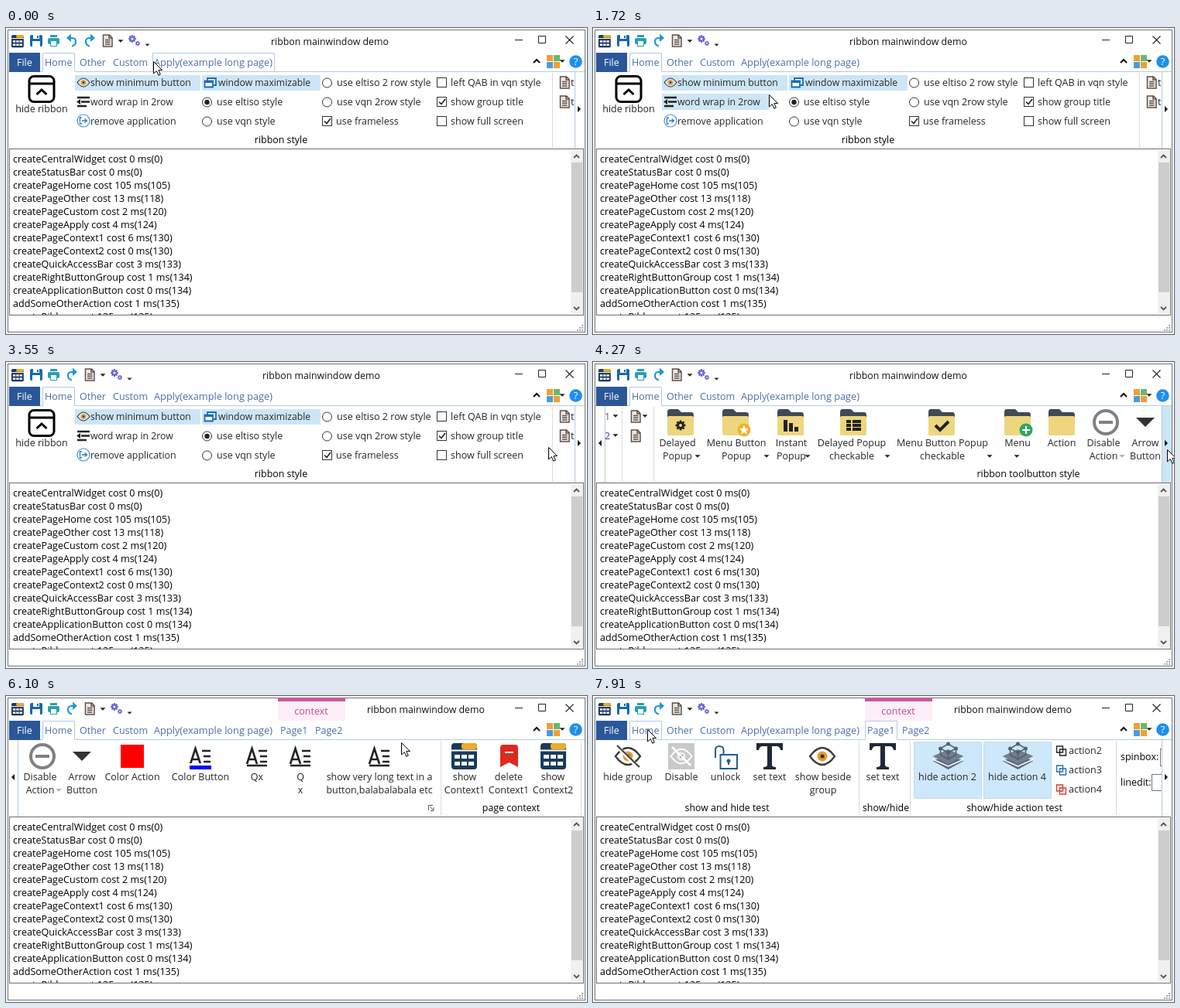
An HTML page with a canvas for the animation above (8000 ms loop, 750x396 px).

```html
<!DOCTYPE html>
<html lang="en">
<head>
<meta charset="utf-8">
<title>ribbon mainwindow demo</title>
<style>
html, body { margin: 0; width: 100%; height: 100%; overflow: hidden; background: #fff; }
canvas { display: block; width: 750px; height: 396px; }
</style>
</head>
<body>
<canvas id="stage" width="750" height="396"></canvas>
<script>
const g = document.getElementById('stage').getContext('2d');
const LOOP = 8000;
const FONT = '"Open Sans", "Noto Sans", "Noto Sans CJK SC", sans-serif';
const INK = '#262626', LIT = '#cde6f7', EDGE = '#b4cbe4', SEP = '#dcdcdc', NAVY = '#1c3a5e', BLUE = '#1f77c0';
const PINK = '#fdeff7', TEAL = '#2a9fb0', LOCK = '#245a94';

// Moments when the window state changes
const MENU_OPEN = 670, MENU_DONE = 1720, SCROLL_1 = 4030, SCROLL_2 = 4830,
      CONTEXT = 5710, PAGE_2 = 6610, PAGE_1 = 7090;

// Pointer stops: time, x, y
const POINTER = [
  [0, 190, 43], [120, 187, 39], [270, 185, 28], [390, 182, 18], [790, 184, 20], [910, 190, 24],
  [1060, 209, 54], [1180, 219, 71], [1300, 226, 85], [1450, 227, 86], [2000, 226, 82],
  [2150, 226, 67], [2300, 240, 62], [2420, 256, 58], [2570, 284, 54], [2690, 304, 51],
  [2840, 307, 55], [3120, 443, 63], [3270, 552, 84], [3400, 638, 103], [3550, 700, 110],
  [3670, 736, 113], [3790, 741, 113], [5140, 655, 113], [5290, 628, 110], [5410, 613, 107],
  [5560, 597, 102], [5830, 591, 90], [5980, 556, 74], [6100, 510, 60], [6220, 458, 48],
  [6340, 424, 44], [6460, 416, 43], [6850, 396, 43], [6970, 377, 43], [7090, 375, 43],
  [7520, 262, 42], [7640, 172, 41], [7790, 112, 42], [7910, 70, 43]
];
const TABS = [['Home', 47, 89], ['Other', 92, 133], ['Custom', 135, 186], ['Apply(example long page)', 187, 347],
              ['Page1', 351, 393], ['Page2', 396, 437]];
const LOG = ['createCentralWidget cost 0 ms(0)', 'createStatusBar cost 0 ms(0)', 'createPageHome cost 105 ms(105)',
  'createPageOther cost 13 ms(118)', 'createPageCustom cost 2 ms(120)', 'createPageApply cost 4 ms(124)',
  'createPageContext1 cost 6 ms(130)', 'createPageContext2 cost 0 ms(130)', 'createQuickAccessBar cost 3 ms(133)',
  'createRightButtonGroup cost 1 ms(134)', 'createApplicationButton cost 0 ms(134)',
  'addSomeOtherAction cost 1 ms(135)', 'createRibbon cost 135 ms(135)'];

let mx = 0, my = 0;
const over = (x0, y0, x1, y1) => mx >= x0 && mx < x1 && my >= y0 && my < y1;

function rect(c, x, y, w, h) { g.fillStyle = c; g.fillRect(x, y, w, h); }
function box(c, x, y, w, h) { g.strokeStyle = c; g.lineWidth = 1; g.strokeRect(x + .5, y + .5, w - 1, h - 1); }
function fill(c, d) { g.fillStyle = c; g.fill(new Path2D(d)); }
function line(c, w, d) { g.strokeStyle = c; g.lineWidth = w; g.stroke(new Path2D(d)); }
function disc(c, x, y, r, w) {
  g.beginPath(); g.arc(x, y, r, 0, 7);
  if (w) { g.strokeStyle = c; g.lineWidth = w; g.stroke(); } else { g.fillStyle = c; g.fill(); }
}
function round(c, x, y, w, h, r) { g.beginPath(); g.roundRect(x, y, w, h, r); g.fillStyle = c; g.fill(); }
function at(x, y, s, draw) { g.save(); g.translate(x, y); g.scale(s, s); draw(); g.restore(); }
function clip(x, y, w, h, draw) { g.save(); g.beginPath(); g.rect(x, y, w, h); g.clip(); draw(); g.restore(); }
function text(s, x, y, c = INK, size = 12.5, align = 'left') {
  g.font = `${size}px ${FONT}`; g.fillStyle = c; g.textAlign = align;
  g.fillText(s, x, Math.floor(y + 4.5)); // whole-pixel baseline
}
const mid = (s, x, y, c, size) => text(s, x, y, c, size, 'center');
const label = (x, ...rows) => rows.forEach((s, i) => mid(s, x, 104.5 + 17 * i));
const caption = (s, x) => mid(s, x, 145, '#000', 12.4);
const sep = x => rect(SEP, x, 58, 1, 97);
const down = (x, y, c = '#222', r = 3.5) => fill(c, `M${x - r} ${y - r / 2}h${2 * r}l${-r} ${r}z`);

// ---- icons ----
const doc = (x, y, s = .5) => at(x, y, s, () => {
  fill('#f0e8e2', 'M2 2H18L25 9V32H2Z');
  line('#5c504c', 3, 'M2 2H18L25 9V32H2ZM17 2V10H25M7 15H20M7 20.500H20M7 26H20');
});
const grid = (x, y, s = 1) => at(x, y, s, () => {
  round(NAVY, 0, 0, 33, 34, 4);
  round('#f0ab24', 13, 0, 20, 8, 3);
  rect('#fff', 0, 8.5, 33, 2);
  for (let i = 0; i < 6; i++) rect('#fff', 4 + i % 3 * 9, i < 3 ? 15 : 24, 7, 5);
});
const eye = (x, y, s = 1, c = '#3c3c3c', iris = '#e79a2c') => at(x, y, s, () => {
  line(c, 2.3, 'M-16 0Q-8 -11 0 -11Q8 -11 16 0Q8 11 0 11Q-8 11 -16 0Z');
  disc(iris, 0, 0, 6.5); disc('#333', 0, 0, 2.5);
});
const gear = (x, y, r, c) => {
  for (let i = 0; i < 8; i++) {
    const a = i * Math.PI / 4, u = Math.cos(a) * r, v = Math.sin(a) * r;
    line(c, r * .5, `M${x + u * .5} ${y + v * .5}L${x + u * 1.3} ${y + v * 1.3}`);
  }
  disc(c, x, y, r * .7, r * .6);
};
const folder = (x, deco) => at(x - 17, 61, 1, () => {
  fill('#414a55', 'M0 4Q0 0 3 0H14L18 4H31Q34 4 34 8V14H0Z');
  round('#edd67e', 0, 9, 34, 25, 2);
  if (deco) deco();
});
const letterA = x => at(x, 78, 1, () => {
  line('#222', 2.6, 'M-13 10L-6.500 -10L0 10M-10.500 4H-2.500');
  line('#222', 2.4, 'M2 -7H13M4 0H13M4 7H13M-13 12H13');
});
const bigT = x => fill('#1f2937', `M${x - 17} 61h34v9h-3q-1 -5 -5 -5h-6v24q0 3 5 3v3h-16v-3q5 0 5 -3v-24h-6q-4 0 -5 5h-3z`);
const layers = x => at(x, 78, 1, () => {
  fill('#5b6b7e', 'M-20 6L0 -2L20 6L0 17Z');
  line('#fff', 1.5, 'M-20 4L0 13L20 4');
  fill('#72808f', 'M-20 0L0 -9L20 0L0 10Z');
  line('#56606c', 1.6, 'M-10 -2V-10L0 -16L10 -10V-2L0 4ZM-10 -10L0 -5L10 -10M0 -5V4');
  for (const [x, y] of [[-10, -10], [0, -16], [10, -10], [0, -5]]) disc('#56606c', x, y, 2.5);
});
const copies = (y, c) => { line(c, 1.4, `M598.500 ${y - 6}h8v8h-8zM602.500 ${y - 2}h8v8h-8z`); };
const curl = (x, flip) => {
  g.save(); g.translate(x, 16); g.scale(flip, 1);
  line('#2196d8', 2.2, 'M-4 -3H1Q5 -3 5 2Q5 6 0 7.500'); fill('#2196d8', 'M-7 -3L-1 -8.500V2Z');
  g.restore();
};

function quickBar(t) {
  const shift = t < MENU_DONE ? 0 : -23;
  grid(7, 9, .48);
  round('#1668ad', 31, 9, 16, 15, 2); rect('#fff', 35, 9, 8, 5); rect('#fff', 34, 17, 10, 7); rect('#1668ad', 40, 10, 2, 3);
  round(TEAL, 54, 13, 15, 8, 2); rect(TEAL, 57, 9, 9, 3); rect('#fff', 57, 17, 9, 7); box(TEAL, 57, 16, 9, 8);
  if (!shift) curl(85, 1);
  curl(108 + shift, -1);
  doc(124.5 + shift, 8); down(148 + shift, 17);
  gear(163 + shift, 14, 3.8, '#6968d0'); gear(170 + shift, 20, 2.4, '#6968d0');
  const open = t >= MENU_OPEN && t < MENU_DONE;
  if (open || t < MENU_DONE && over(178, 6, 189, 28)) { rect(LIT, 178, 6, 11, 22); box('#8dbfe6', 178, 6, 11, 22); }
  down(182.5 + shift, 22, '#222', 3);
}

function frameParts(t) {
  rect('#fff', 0, 0, 750, 396);
  box('#707070', 2, 2, 746, 392);
  if (t >= CONTEXT) {
    rect(PINK, 351, 2, 87, 30);
    rect('#c9579f', 351, 2, 87, 5);
    mid('context', 394, 20, '#bd4a94');
  }
  text('ribbon mainwindow demo', t < MENU_DONE ? 342 : t < CONTEXT ? 331 : 466, 17.5, '#111', 12.35);
  line('#222', 1, 'M657 15.500h10M687.500 10.500h9v9h-9z');
  line('#222', 1.1, 'M722.500 10.500l10 10M732.500 10.500l-10 10');
  line('#111', 2, 'M681 45l4 -4l4 4');
  ['#ef9f35', '#68b96b', '#4a9cd8', '#ef9f35'].forEach((c, i) => rect(c, 698 + i % 2 * 9, 35 + (i >> 1) * 9, 8, 8));
  down(718, 43);
  disc('#1d8ff0', 735.5, 43.5, 8.3);
  mid('?', 735.5, 43.5, '#fff', 13);
}

function tabs(t) {
  const active = t < PAGE_2 ? 'Home' : t < PAGE_1 ? 'Page2' : 'Page1';
  rect(EDGE, 3, 56, 744, 1);
  rect('#2b579a', 4, 32, 40, 25);
  text('File', 14, 45, '#fff');
  const menu = t >= MENU_OPEN && t < MENU_DONE;
  TABS.forEach(([name, x0, x1], i) => {
    if (i > 3 && t < CONTEXT) return;
    const on = name === active, hot = !menu && over(x0, 32, x1 + 1, 57), left = i === 3 ? 189 : x0;
    if (on) rect('#fff', left, 33, x1 - left, 24);
    else if (hot && i > 3) rect(PINK, left, 33, x1 - left, 23);
    if (on || hot) line(EDGE, 1, `M${left + .5} 56.500V32.500H${x1 - .5}V56.500`);
    text(name, left + (i === 3 ? 2 : 3), 45, '#4c6fa8', i === 3 ? 12.75 : 12.5);
  });
}

function check(x, y, on) {
  box('#333', x, y, 13, 13);
  if (on) line('#222', 1.6, `M${x + 3} ${y + 6.500}l3 3l5 -6.500`);
}
function radio(x, y, on, hot) {
  disc(hot ? '#0078d7' : '#333', x, y, 6, 1);
  if (on) disc('#222', x, y, 3.2);
}

function homeStart() {
  g.beginPath(); g.roundRect(30, 62.5, 32, 33, 6); g.strokeStyle = '#000'; g.lineWidth = 3; g.stroke();
  line('#000', 3, 'M30 72H62M39.500 86l6.500 -6l6.500 6');
  label(46, 'hide ribbon');
  rect(LIT, 89, 61, 162, 20); rect(LIT, 253, 61, 153, 20);
  if (over(89, 85, 240, 107)) rect(LIT, 89, 85, 138, 21);
  eye(100, 70.5, .5);
  line('#222', 2.4, 'M92 90H108M97 95.500H108M92 101H104'); fill('#222', 'M91 95.500l5 -3.500v7z');
  disc('#4a90c8', 100, 120, 8, 1.2); line('#2f7fbd', 1.3, 'M98 116H95.500V124H98M98 120H104M101.500 117.500l3 2.500l-3 2.500');
  text('show minimum button', 109, 70.5, INK, 12.2);
  text('word wrap in 2row', 109, 95.5, INK, 12.3);
  text('remove application', 109, 120.5, INK, 12.4);
  rect('#fff', 257, 66, 10, 9); line('#1b6db5', 1.8, 'M260 68V65H271V74H268M256.500 68.500H267V76.500H256.500ZM257 70H267');
  text('window maximizable', 274, 70.5, INK, 12.2);
  radio(259.5, 96, true); text('use eltiso style', 272, 96);
  radio(259.5, 121); text('use vqn style', 272, 121);
  radio(414.5, 71, false, over(408, 60, 555, 82)); text('use eltiso 2 row style', 427, 71, INK, 12.6);
  radio(414.5, 96); text('use vqn 2row style', 427, 96, INK, 12.6);
  check(408, 114, true); text('use frameless', 426, 121);
  check(556, 64); text('left QAB in vqn style', 574, 71);
  check(556, 89, true); text('show group title', 574, 96);
  check(556, 114); text('show full screen', 574, 121);
  caption('ribbon style', 355);
  sep(705);
  for (const y of [62, 87]) { doc(714.5, y); text('test', 729, y + 8.5); }
}

function homeRest() {
  text('1', 15, 70.5, '#8a4f1e'); down(29, 70);
  text('2', 15, 95.5, '#4a3fa0'); down(29, 95);
  sep(37);
  doc(48.5, 62); down(67, 70); doc(48.5, 87);
  sep(78);
  folder(113, () => gear(17, 21, 5, '#222'));
  folder(184, () => {
    disc('#f0b429', 28, 27, 8.5);
    fill('#fff', 'M28 21l1.800 4l4.200 .4l-3.200 2.800l1 4.200l-3.800 -2.200l-3.800 2.200l1 -4.200l-3.200 -2.800l4.200 -.4z');
  });
  folder(255, () => { rect('#222', 8, 14, 5, 15); rect('#222', 15, 18, 5, 11); rect('#222', 22, 23, 5, 6); });
  folder(336, () => { for (let i = 0; i < 6; i++) rect('#222', i % 2 ? 16 : 8, 14 + (i >> 1) * 5, i % 2 ? 11 : 6, 4); });
  folder(450, () => line('#222', 4, 'M9 21l6 6l11 -11'));
  folder(548, () => { disc('#30a566', 28, 27, 8.5); line('#fff', 2.2, 'M23 27h10M28 22v10'); });
  folder(605);
  label(109, 'Delayed', 'Popup'); down(135, 122);
  label(185, 'Menu Button', 'Popup'); down(224, 122);
  label(256, 'Instant', 'Popup'); down(277, 122);
  label(334, 'Delayed Popup', 'checkable'); down(380, 122);
  label(451, 'Menu Button Popup', 'checkable'); down(512, 122);
  label(548, 'Menu'); down(547, 122);
  label(605, 'Action');
  disc('#808080', 662, 78, 15, 4); rect('#808080', 653, 76, 18, 4);
  label(659, 'Disable', 'Action'); down(683, 122, '#aaa');
  fill('#333', 'M701 72H725L713 84Z');
  label(713, 'Arrow', 'Button');
  caption('ribbon toolbutton style', 562);
}

function homeEnd() {
  rect('#f00', 148, 63, 30, 30); label(163, 'Color Action');
  letterA(251); rect('#fff', 236, 87, 30, 9); rect('#00f', 237, 90, 28, 5); label(251, 'Color Button');
  letterA(324); label(324, 'Qx');
  letterA(380); label(380, 'Q', 'x');
  letterA(482); label(482, 'show very long text in a', 'button,balabalabala etc');
  line('#555', 1, 'M545.500 148V141.500H551M547.500 143.500l4 4M552 144V148.500H548');
  sep(561);
  if (over(565, 59, 620, 133)) rect(LIT, 565, 59, 55, 74);
  if (over(622, 59, 677, 133)) rect(LIT, 622, 59, 55, 74);
  grid(575, 61); label(592, 'show', 'Context1');
  fill('#dc2a20', 'M638 67q0 -4 4 -4h15q4 0 4 4v25l-11.500 -6l-11.500 6z'); rect('#fff', 644, 72, 11, 2);
  label(649, 'delete', 'Context1');
  grid(690, 61); label(706, 'show', 'Context2');
  caption('page context', 652);
  sep(742);
}

function pageTwo() {
  disc('#f8403c', 38, 78, 17); line('#fff', 4, 'M31.500 71.500l13 13M44.500 71.500l-13 13');
  label(38, 'delete this', 'page');
  caption('删除PagePage测试', 59);
  sep(113);
  const item = (x, y, s) => { doc(x, y - 8.5); text(s, x + 16.5, y); };
  for (const x of [145, 416, 639]) { doc(x - 13.5, 61, 1); label(x, 'Large'); }
  for (const [x, y] of [[179, 70], [179, 95], [253, 70], [253, 95], [253, 120], [319, 70], [533, 70]]) item(x, y + .5, 'Small');
  sep(243); sep(386);
  for (const [x, y] of [[450, 79], [450, 112], [533, 112], [673, 79], [673, 112]]) item(x, y, 'Medium');
  caption('特殊布局', 581);
}

function pageOne() {
  eye(45, 78); line('#fff', 5, 'M33 67L58 92'); line('#444', 2.3, 'M31 64L60 92');
  label(45, 'hide group');
  rect('#c9c9c9', 97, 61, 34, 34); eye(114, 78, .85, '#fff', '#eee'); line('#fff', 2.5, 'M102 66L126 90');
  label(114, 'Disable');
  line(LOCK, 2, 'M164.500 76H186V94H164.500ZM158 80V70Q158 65 163 65Q168.500 65 168.500 70V76');
  disc(LOCK, 175, 84, 2.5); line(LOCK, 2, 'M175 84V89');
  label(171, 'unlock');
  bigT(228); label(228, 'set text');
  eye(296, 78); label(297, 'show beside', 'group');
  caption('show and hide test', 173);
  sep(343);
  bigT(374); label(374, 'set text');
  caption('show/hide', 378);
  sep(409);
  for (const [x, n] of [[414, 2], [504, 4]]) {
    rect('#cde8fb', x, 59, 88, 74); box('#bddcf2', x, 59, 88, 74);
    layers(x + 44.5); label(x + 43.5, 'hide action ' + n);
  }
  ['#222', '#2472b5', '#e03a30'].forEach((c, i) => { copies(71 + 25 * i, c); text('action' + (i + 2), 614, 71 + 25 * i); });
  caption('show/hide action test', 544);
  sep(675);
  text('spinbox:', 681, 79, '#000'); box('#777', 732, 68, 40, 23);
  text('linedit:', 681, 112, '#000'); box('#777', 721, 101, 50, 22);
}

function ribbon(t) {
  const scrolled = t >= SCROLL_1 && t < PAGE_2, atEnd = t >= SCROLL_2 && t < PAGE_2;
  const left = scrolled ? 16 : 3, right = atEnd ? 747 : 735;
  clip(left, 57, right - left, 99, () => {
    if (t < SCROLL_1) homeStart();
    else if (t < SCROLL_2) homeRest();
    else if (t < PAGE_2) { at(-615, 0, 1, homeRest); homeEnd(); }
    else if (t < PAGE_1) pageTwo();
    else pageOne();
  });
  if (scrolled) { rect(EDGE, 15, 57, 1, 99); fill('#111', 'M11 101v8l-4 -4z'); }
  if (!atEnd) {
    if (over(735, 57, 747, 156)) rect(LIT, 735, 57, 12, 99);
    rect(EDGE, 734, 57, 1, 99);
    fill('#111', 'M738 101v8l4 -4z');
  }
}

function logView() {
  box('#6e6e6e', 4, 156, 742, 216);
  clip(5, 157, 723, 214, () => LOG.forEach((s, i) => text(s, 9, 170 + 17 * i, '#000', 12.6)));
  rect('#f0f0f0', 729, 158, 16, 212);
  rect('#cdcdcd', 730, 174, 14, 168);
  line('#555', 1.8, 'M733 168l3.500 -3.500l3.500 3.500M733 361l3.500 3.500l3.500 -3.500');
  for (let i = 0; i < 3; i++) for (let j = 0; j <= i; j++) rect('#aaa', 743 - 3 * j, 384 + 3 * i, 2, 2);
}

function menu() {
  rect('rgba(0,0,0,.18)', 182, 32, 173, 137);
  rect('rgba(0,0,0,.25)', 181, 31, 173, 137);
  rect('#f0f0f0', 178, 28, 175, 138); box('#a0a0a0', 178, 28, 175, 138);
  ['save', 'printer', 'undo', 'redo', 'file', 'customize and save'].forEach((s, i) => {
    const y = 31 + 22 * i, hot = over(181, y, 348, y + 22);
    if (hot) rect('#91c9f7', 181, y, 167, 22);
    rect(hot ? '#56b0fa' : '#91c9f7', 181, y, 22, 22);
    line('#333', 1.5, `M188 ${y + 11}l3 3l6 -6.500`);
    text(s, 213, y + 11.5, '#111');
  });
}

function pointer() {
  at(mx, my, 1, () => {
    const d = 'M.5 .5V16L4.300 12.600L6.800 18.200L9.300 17.100L6.900 11.600H11.500Z';
    fill('#fff', d); line('#000', 1, d);
  });
}

function draw(t) {
  for (const [time, x, y] of POINTER) if (time <= t) { mx = x; my = y; }
  frameParts(t);
  quickBar(t);
  tabs(t);
  ribbon(t);
  logView();
  if (t >= MENU_OPEN && t < MENU_DONE) menu();
  pointer();
}

const start = performance.now();
function tick() {
  draw((performance.now() - start) % LOOP);
  requestAnimationFrame(tick);
}
tick();
</script>
</body>
</html>
```
